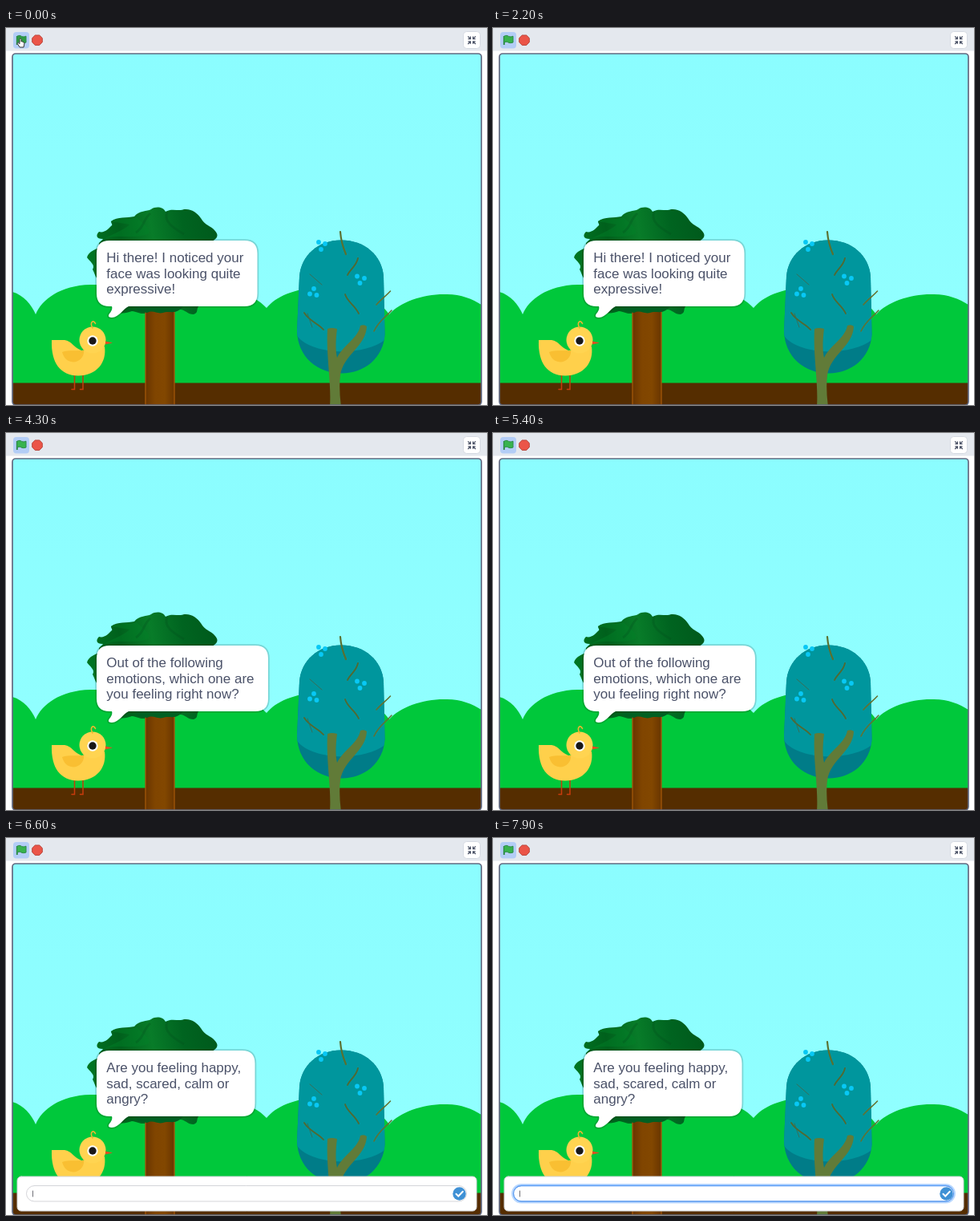
An HTML page with a canvas that plays this animation: 600 px wide and 470 px high, repeating every 8 s.

```html
<!DOCTYPE html>
<html lang="en">
<head>
<meta charset="utf-8">
<title>Talking chick</title>
<style>
html, body { margin: 0; width: 100%; height: 100%; overflow: hidden; background: #fff; }
canvas { display: block; width: 600px; height: 470px; }
</style>
</head>
<body>
<canvas id="stage" width="600" height="470"></canvas>
<script>
const ctx = document.getElementById('stage').getContext('2d');
const LOOP = 8000, ASK_AT = 6600;
const LINES = [
  { from: 0, right: 313.5, text: ['Hi there! I noticed your', 'face was looking quite', 'expressive!'] },
  { from: 2600, right: 327, text: ['Out of the following', 'emotions, which one are', 'you feeling right now?'] },
  { from: ASK_AT, right: 310.5, text: ['Are you feeling happy,', 'sad, scared, calm or', 'angry?'] }
];

function shape(d, fill, stroke, width = 1) {
  const p = typeof d === 'string' ? new Path2D(d) : d;
  if (fill) { ctx.fillStyle = fill; ctx.fill(p); }
  if (stroke) { ctx.strokeStyle = stroke; ctx.lineWidth = width; ctx.stroke(p); }
}
function dot(x, y, r, fill, stroke, width) {
  const p = new Path2D();
  p.arc(x, y, r, 0, Math.PI * 2);
  shape(p, fill, stroke, width);
}
function box(x, y, w, h, r, fill, stroke, width) {
  const p = new Path2D();
  p.roundRect(x, y, w, h, r);
  shape(p, fill, stroke, width);
}
function blend(x0, y0, x1, y1, ...colors) {
  const g = ctx.createLinearGradient(x0, y0, x1, y1);
  colors.forEach((c, i) => g.addColorStop(i / (colors.length - 1), c));
  return g;
}

function drawHeader(hover) {
  ctx.fillStyle = '#e4e8ee';
  ctx.fillRect(0, 0, 600, 28.5);
  box(9, 5, 20, 20.5, 4, '#b3cdf6');
  const green = hover ? '#2f9a45' : '#38b34f';
  shape('M13.5 10.5C16 8.7 18 9.4 19.5 10.4C21.5 11.5 23.5 10.6 25 10.2V18C22.5 19 20.5 18.8 18.5 17.7C16.8 16.8 15.2 17.3 14.2 18V21', green, '#2b8a44', 1);
  shape('M13.5 10V21', null, '#2b8a44', 1.3);
  shape('M36.3 9H41.7L45.3 12.6V17.8L41.7 21.4H36.3L32.7 17.8V12.6Z', '#eb5548', '#b8463c', 1);
  box(570.5, 4.5, 21, 21, 4, '#fff', '#d5dae2');
  for (const sx of [-1, 1]) for (const sy of [-1, 1]) {
    const at = (a, b) => `${581 + sx * a} ${15.2 + sy * b}`;
    shape(`M${at(4.8, 4.8)}L${at(2, 2)}M${at(1.6, 4.6)}L${at(1.6, 1.6)}L${at(4.6, 1.6)}`, null, '#4d5468', 1.3);
  }
}

function drawScene() {
  ctx.fillStyle = blend(0, 32, 0, 340, '#8bfdff', '#90ffff');
  ctx.fillRect(8, 32, 585, 438);
  shape('M8 329C22 333 32 345 37 357C45 338 68 321 105 320C135 320 155 327 175 335C215 318 295 316 325 349C337 335 357 325 395 323C440 324 465 338 478 357C492 341 522 331 550 332C568 332 582 338 593 345V445H8Z', '#00c83b');
  ctx.fillStyle = '#552d00';
  ctx.fillRect(8, 442.5, 585, 28);
}

function drawGreenTree() {
  const leaves = 'M131 241C139 235 151 237 160 235C166 227 176 229 181 226C187 222 196 223 199 229C207 224 216 229 222 226C232 225 239 231 243 237C248 246 256 247 260 252C266 258 264 262 257 266L264 300L252 340L242 345C236 350 241 355 234 357C226 357 223 350 216 351C208 357 203 353 196 355C188 358 185 352 178 355C168 358 165 354 157 353C150 355 146 357 138 354L126 340L120 318C111 313 111 306 108 301C112 295 104 291 101 286C103 278 113 276 119 272C112 269 119 266 121 263C112 263 112 258 116 254C123 256 128 250 131 247C134 245 131 244 131 241Z';
  shape(leaves, blend(105, 275, 262, 250, '#007422', '#00601c', '#087c29', '#006420', '#005a1c'));
  shape('M131 241C145 234 156 240 163 236C170 244 180 248 178 256C163 264 145 257 124 262C137 255 148 251 154 245Z', '#00832a66');
  shape('M201 229C196 241 208 249 222 257M180 231C170 240 173 248 162 255', null, '#004d1a44', 3);
  box(174, 342, 36, 135, 0, blend(174, 0, 210, 0, '#693500', '#804500', '#824700', '#693500'), '#a45708', 1.3);
  shape('M160 346H222L217 351C209 357 203 352 196 355C188 357 184 351 176 355L164 353Z', '#006022');
}

function drawBlueTree() {
  ctx.lineCap = 'round';
  const crown = new Path2D('M363 378L366 310C368 283 390 264.500 418 264.500C447 264.500 469 283 471 310L472.500 382C471 411 447 430.500 419 430.500C388 430.500 364 410 363 378Z');
  shape(crown, '#007c88');
  ctx.save();
  ctx.clip(crown);
  shape('M355 255H480V381C461 410 380 411 362 382Z', '#00969d');
  ctx.restore();
  shape('M417 254Q418 268 424 282', null, '#5b702f', 2.2);
  shape('M439 287C437 297 429 301 426 308M423 332C426 342 435 345 440 356M372 355C379 366 389 368 396 376', null, '#53682f', 1.8);
  shape('M379 307L394 320M376 356L382 373', null, '#386f58', 1);
  shape('M479.500 328C474 334 468 338 462 345M481 352C473 361 465 365 459 378', null, '#66702d', 1.5);
  shape('M404 472C406 441 399 409 401 375Q406 373 413 375C411 391 411 402 413 411C421 395 439 387 442 371Q447 369 450 372C449 397 421 407 417 433Q415 449 418 472Z', '#617b38');
  const berries = [[390, 267], [398, 269], [393, 276], [384, 325], [379, 331.5], [387.5, 333], [438, 309.5], [447, 312], [441.500, 318]];
  for (const [x, y] of berries) dot(x, y, 2.9, '#08c8f5');
}

function drawChick() {
  shape('M85.500 431V450.500H82M96 431V450.500H92.500', null, '#c93b0c', 1.5);
  shape('M57 389H73C82 390 84 398 94 402L123 397C126 417 113 433.500 90 433.500C68 433 56 418 57 389Z', '#ffd04b');
  dot(108, 389, 16.5, '#ffd451');
  shape('M70 404C78 401 89 403 97 402C98 410 91 416.500 84 416.500C76 416 72 411 70 404Z', '#f9bf32');
  shape('M108 374C104 367 109 363 111.500 368.500', null, '#edb62f', 1.6);
  dot(108, 390, 6.7, '#fff');
  dot(108, 390, 4.7, '#181818');
  shape('M124 390.500L133 392.500L124 394.500Z', '#e64c20');
}

function drawBubble({ right, text }) {
  const p = new Path2D(`M129 265H${right - 16}Q${right} 265 ${right} 281V331Q${right} 347 ${right - 16} 347H153C147 349 141 361 132 361C127 361 127 358 130 355C132 352 133 349 132 347H129Q113 347 113 331V281Q113 265 129 265Z`);
  shape(p, null, 'rgba(0,0,0,.16)', 3.5);
  shape(p, '#fff');
  ctx.fillStyle = '#4b5269';
  ctx.font = '17px "Liberation Sans", Arial, sans-serif';
  text.forEach((line, i) => ctx.fillText(line, 125.3, 292 + i * 19.5));
}

function drawPrompt(age) {
  const focus = Math.min(1, age / 250);
  box(14, 422, 573, 43, 5, '#fff', '#d0d4da', 1);
  ctx.globalAlpha = focus;
  box(25, 433, 550, 20.5, 10.2, null, '#b9d8ff', 4);
  ctx.globalAlpha = 1;
  box(25.5, 433.5, 549, 19.5, 9.8, '#fff', '#d5d5d9', 1);
  ctx.globalAlpha = focus;
  box(25.5, 433.5, 549, 19.5, 9.8, null, '#599cf5', 1.3);
  ctx.globalAlpha = 1;
  dot(565.5, 443.5, 8.2, '#3f91d5');
  shape('M561.500 443.800L564.300 446.500L569.800 440.800', null, '#fff', 2);
  if (age % 1000 < 500) shape('M33.500 440V447', null, '#707078', 1);
}

function drawHand() {
  shape('M17 14.500C16.800 12.700 19 12.700 19 14.500V17C20.300 16.300 20.800 17 21 17.700C22.300 17.300 23 18.200 22.800 20L22 24H17.200L14.300 19.700C13.700 18.500 15.300 17.900 17 19.700Z', '#fff', '#333', 1);
}

function draw(t) {
  ctx.fillStyle = '#fff';
  ctx.fillRect(0, 0, 600, 470);
  const hover = t < 300;
  drawHeader(hover);
  ctx.save();
  ctx.beginPath();
  ctx.roundRect(8, 32, 585, 438, 4);
  ctx.clip();
  drawScene();
  drawGreenTree();
  drawBlueTree();
  drawChick();
  drawBubble(LINES.findLast(l => t >= l.from));
  if (t >= ASK_AT) drawPrompt(t - ASK_AT);
  ctx.restore();
  box(8, 32, 585, 438, 4, null, '#626981', 1.7);
  if (hover) drawHand();
}

const start = performance.now();
function tick() {
  draw((performance.now() - start) % LOOP);
  requestAnimationFrame(tick);
}
tick();
</script>
</body>
</html>
```
